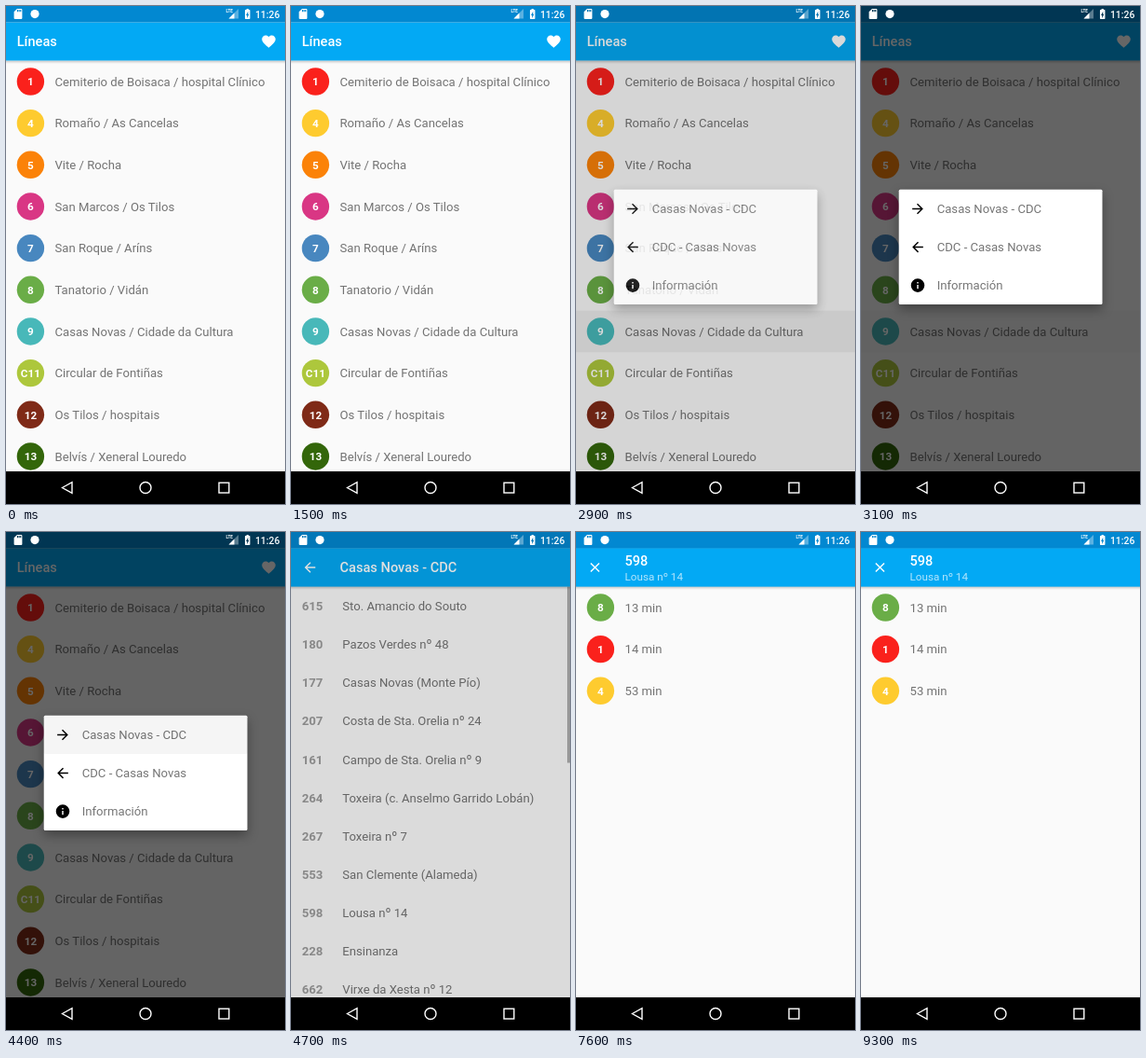
These frames come from a looping animation (300 by 534 pixels, 9600 ms). An HTML page:

```html
<!DOCTYPE html>
<html lang="gl">
<head>
<meta charset="utf-8">
<title>Líneas</title>
<style>
html, body { margin: 0; width: 100%; height: 100%; overflow: hidden; background: #000; }
svg { display: block; width: 100vw; height: 100vh; }
text { font-family: Roboto, "Noto Sans", sans-serif; }
.label { font-size: 13.14px; fill: #000; fill-opacity: .54; }
.code { font-size: 13.14px; font-weight: 700; fill: #000; fill-opacity: .38; }
.badge { font-size: 11.7px; font-weight: 700; fill: #fff; text-anchor: middle; }
.title { font-size: 14.6px; font-weight: 500; fill: #fff; }
.subtitle { font-size: 11.7px; fill: #fff; fill-opacity: .7; }
.clock { font-size: 10.4px; font-weight: 500; fill: #fff; text-anchor: end; }
.lte { font-size: 4.6px; font-weight: 700; fill: #fff; }
#card { filter: drop-shadow(0 5px 6px rgba(0, 0, 0, .35)); }
</style>
</head>
<body>
<svg viewBox="0 0 300 534">
  <defs>
    <linearGradient id="fade" x2="0" y2="1">
      <stop offset="0" stop-opacity=".2"/><stop offset="1" stop-opacity="0"/>
    </linearGradient>
  </defs>
  <rect width="300" height="534" fill="#fafafa"/>
  <g id="lines"></g>
  <g id="stops"></g>
  <g id="detail"></g>
  <rect id="statusBar" width="300" height="17.5" fill="#0288d1"/>
  <rect id="dim" width="300" height="499"/>
  <g id="dialog"></g>
  <g id="status"></g>
  <g id="nav">
    <rect y="499" width="300" height="35"/>
    <g fill="none" stroke="#fff" stroke-width="1.4">
      <path d="M60.5 516.5L71 510.7V522.3Z"/>
      <circle cx="150" cy="516.5" r="6"/>
      <rect x="229" y="511.2" width="10.8" height="10.8"/>
    </g>
  </g>
</svg>
<script>
const LOOP = 9600, TICK = 100;

const ICONS = {
  heart: "M12 21.35l-1.45-1.32C5.4 15.36 2 12.28 2 8.5 2 5.42 4.42 3 7.5 3c1.74 0 3.41.81 4.5 2.09C13.09 3.81 14.76 3 16.5 3 19.58 3 22 5.42 22 8.5c0 3.78-3.4 6.86-8.55 11.54z",
  back: "M20 11H7.83l5.59-5.59L12 4l-8 8 8 8 1.41-1.41L7.83 13H20z",
  forward: "M12 4l-1.41 1.41L16.17 11H4v2h12.17l-5.58 5.59L12 20l8-8z",
  info: "M12 2a10 10 0 1 0 0 20a10 10 0 1 0 0-20zm1 15h-2v-6h2zm0-8h-2V7h2z",
  close: "M19 6.41L17.59 5 12 10.59 6.41 5 5 6.41 10.59 12 5 17.59 6.41 19 12 13.41 17.59 19 19 17.59 13.41 12z",
  card: "M18 2h-8L4 8v12a2 2 0 0 0 2 2h12a2 2 0 0 0 2-2V4a2 2 0 0 0-2-2zm-6 6h-2V4h2zm3 0h-2V4h2zm3 0h-2V4h2z",
  battery: "M15.67 4H14V2h-4v2H8.33Q7 4 7 5.33v15.33Q7 22 8.33 22h7.33Q17 22 17 20.67V5.33Q17 4 15.67 4zM11 20v-5.5H9L13 7v5.5h2z"
};

const RED = "#fa211c", YELLOW = "#fecb2f", GREEN = "#6aad47";

const LINES = [
  ["1", RED, "Cemiterio de Boisaca / hospital Clínico"],
  ["4", YELLOW, "Romaño / As Cancelas"],
  ["5", "#fb8208", "Vite / Rocha"],
  ["6", "#d93684", "San Marcos / Os Tilos"],
  ["7", "#4887bf", "San Roque / Aríns"],
  ["8", GREEN, "Tanatorio / Vidán"],
  ["9", "#48b8b9", "Casas Novas / Cidade da Cultura"],
  ["C11", "#adc73c", "Circular de Fontiñas"],
  ["12", "#7f2a17", "Os Tilos / hospitais"],
  ["13", "#33660a", "Belvís / Xeneral Louredo"]
];

const STOPS = [
  ["615", "Sto. Amancio do Souto"],
  ["180", "Pazos Verdes nº 48"],
  ["177", "Casas Novas (Monte Pío)"],
  ["207", "Costa de Sta. Orelia nº 24"],
  ["161", "Campo de Sta. Orelia nº 9"],
  ["264", "Toxeira (c. Anselmo Garrido Lobán)"],
  ["267", "Toxeira nº 7"],
  ["553", "San Clemente (Alameda)"],
  ["598", "Lousa nº 14"],
  ["228", "Ensinanza"],
  ["662", "Virxe da Xesta nº 12"]
];

const ARRIVALS = [
  ["8", GREEN, "13 min"],
  ["1", RED, "14 min"],
  ["4", YELLOW, "53 min"]
];

const CHOICES = [
  ["forward", "Casas Novas - CDC"],
  ["back", "CDC - Casas Novas"],
  ["info", "Información"]
];

const $ = id => document.getElementById(id);
const text = (cls, x, y, s) => `<text class="${cls}" x="${x}" y="${y}">${s}</text>`;
const rect = (x, y, w, h, attrs) => `<rect x="${x}" y="${y}" width="${w}" height="${h}" ${attrs}/>`;
const icon = (name, cx, cy, fill = "#fff", scale = .73) =>
  `<path d="${ICONS[name]}" fill="${fill}" fill-rule="evenodd" transform="translate(${cx} ${cy}) scale(${scale}) translate(-12 -12)"/>`;

const page = (bar, body) =>
  rect(0, 58.5, 300, 476, 'fill="#fafafa"') + body +
  rect(0, 58.5, 300, 3.5, 'fill="url(#fade)"') +
  rect(0, 17.5, 300, 41, 'fill="#03a9f4"') + bar;

const badgeRow = ([code, color, label], i) => {
  const y = 81 + 44.66 * i;
  return `<circle cx="26.4" cy="${y}" r="14.7" fill="${color}"/>` +
    text("badge", 26.4, y + 4.3, code) + text("label", 52.5, y + 4.7, label);
};

const stopRow = ([code, label], i) => {
  const y = 84.3 + 41.06 * i;
  return text("code", 11.8, y, code) + text("label", 55.3, y, label);
};

const choiceRow = ([name, label], i) => {
  const y = 217.5 + 41.06 * i;
  return icon(name, 61, y, "#000") + text("label", 81.7, y + 4.7, label);
};

$("lines").innerHTML = page(
  text("title", 11.7, 43.2, "Líneas") + icon("heart", 282.5, 38),
  rect(0, 326.6, 300, 44.7, 'id="linePress"') + LINES.map(badgeRow).join(""));

$("stops").innerHTML = page(
  icon("back", 20.4, 38) + text("title", 52.5, 43.2, CHOICES[0][1]),
  rect(0, 387, 300, 41, 'id="stopPress"') + STOPS.map(stopRow).join("") +
  rect(297, 58.5, 3, 189, 'id="scrollbar" fill-opacity=".3"'));

$("detail").innerHTML = page(
  icon("close", 20.4, 38) + text("title", 52.5, 36, STOPS[8][0]) + text("subtitle", 52.5, 52.3, STOPS[8][1]),
  `<g id="arrivals">${ARRIVALS.map(badgeRow).join("")}</g>`);

$("dialog").innerHTML =
  rect(40.7, 196.7, 218.8, 123.4, 'id="card" rx="1.5" fill="#fff"') +
  rect(40.7, 196.7, 218.8, 41.2, 'id="choicePress" rx="1.5"') +
  CHOICES.map(choiceRow).join("");

$("status").innerHTML =
  icon("card", 13, 8.5, "#fff", .55) +
  '<circle cx="31" cy="8.6" r="4.6" fill="#fff"/>' +
  '<path d="M250 3V13.5H239.5Z" fill="#fff" opacity=".35"/>' +
  '<path d="M245.5 7.5V13.5H239.5Z" fill="#fff"/>' +
  text("lte", 236.5, 6.6, "LTE") +
  icon("battery", 259.7, 8.5, "#fff", .55) +
  text("clock", 294.3, 12.6, "11:26");

// Each track is a list of [time, value] with linear motion between entries.
const OPACITY = {
  linePress: [[2600, 0], [2800, .05], [2900, .05], [3200, 0]],
  dim: [[2840, 0], [2900, .15], [3000, .42], [3100, .6], [4500, .6], [4600, .37], [4700, .125], [4760, 0]],
  dialog: [[2800, 0], [2900, .84], [3000, 1], [4500, 1], [4650, 0]],
  choicePress: [[4100, 0], [4300, .04]],
  stops: [[4500, 0], [4600, .6], [4700, 1]],
  scrollbar: [[6200, 1], [6500, 0]],
  stopPress: [[6300, 0], [6500, .05], [6700, .05], [7000, 0]],
  detail: [[6600, 0], [6800, 1]],
  arrivals: [[7400, 0], [7500, 1]]
};
const SHIFT = {
  stops: [[4500, 40], [4600, 14], [4700, 0]],
  detail: [[6600, 40], [6700, 14], [6800, 4], [6900, 0]]
};

function at(track, t) {
  const next = track.findIndex(([time]) => time > t);
  if (next === 0) return track[0][1];
  if (next < 0) return track[track.length - 1][1];
  const [t0, a] = track[next - 1], [t1, b] = track[next];
  return a + (b - a) * (t - t0) / (t1 - t0);
}

function render(t) {
  for (const id in OPACITY) $(id).setAttribute("opacity", at(OPACITY[id], t));
  for (const id in SHIFT) $(id).setAttribute("transform", `translate(0 ${at(SHIFT[id], t)})`);
}

const start = performance.now();
function loop() {
  const t = (performance.now() - start) % LOOP;
  render(Math.floor(t / TICK) * TICK);
  requestAnimationFrame(loop);
}
render(0);
requestAnimationFrame(loop);
</script>
</body>
</html>
```
